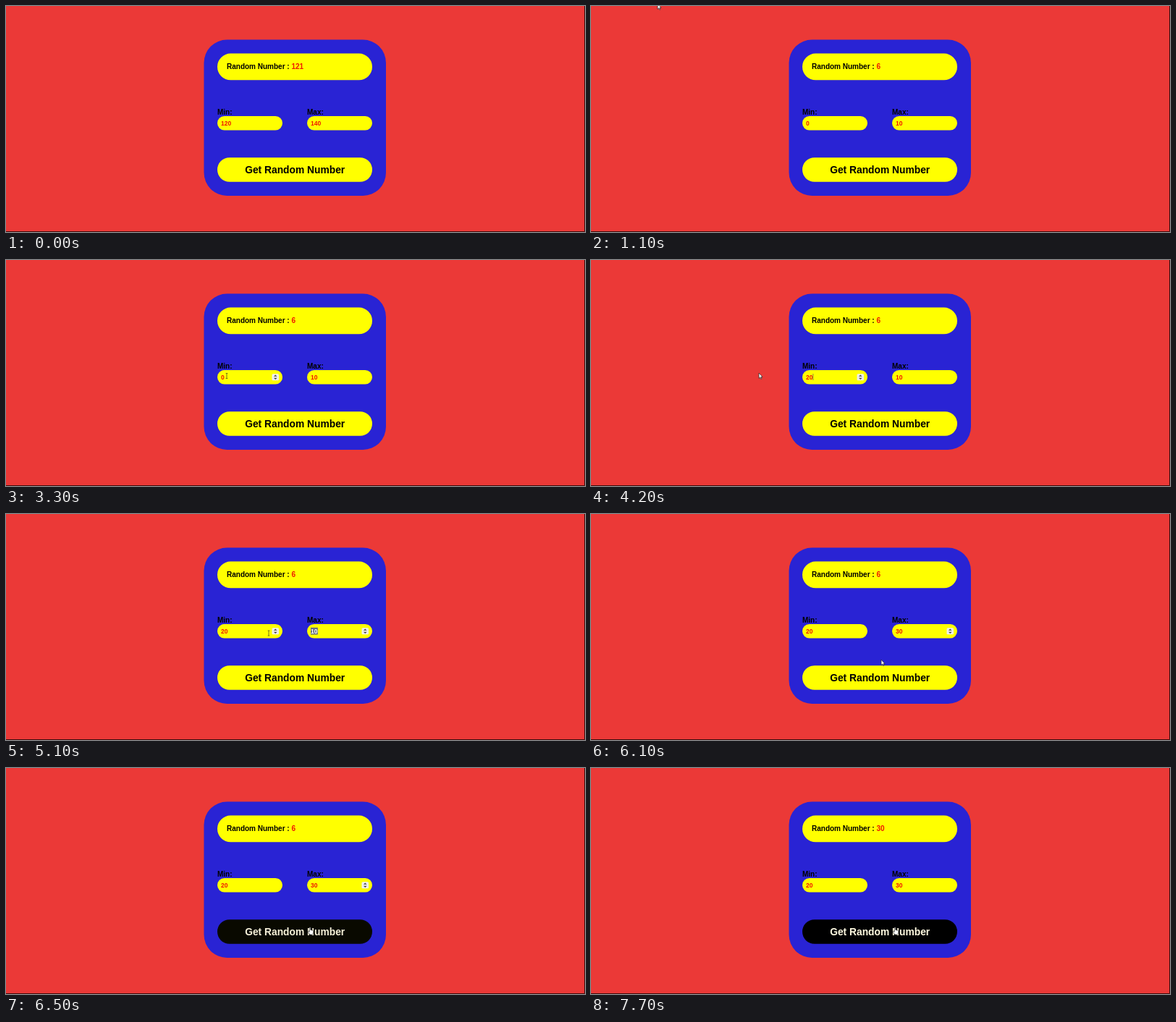
Write an HTML page that moves like this. It is 800x312 px and loops after 8000 ms.

```html
<!DOCTYPE html>
<html lang="en">
<head>
<meta charset="utf-8">
<title>Random number</title>
<style>
  html, body { margin: 0; width: 100%; height: 100%; overflow: hidden; background: #eb3937; }
  svg { display: block; width: 800px; height: 312px; }
  text { font: bold 10px "Liberation Sans", Arial, sans-serif; }
  .pill { fill: #ff0; }
  .red { fill: #f01800; }
  .value { font-size: 8.5px; }
  #label { font-size: 13.8px; text-anchor: middle; }
</style>
</head>
<body>
<svg viewBox="0 0 800 312">
  <defs>
    <g id="spin">
      <rect width="9.5" height="9" rx="1.5" fill="#efefef"/>
      <path d="M2.4 3.6 4.75 1.2 7.1 3.6ZM2.4 5.5 4.75 7.9 7.1 5.5Z" fill="#444"/>
    </g>
  </defs>
  <rect width="800" height="312" fill="#eb3937"/>
  <path d="M0 311.5H799.5V0" fill="none" stroke="#3a0c0c"/>
  <rect x="273.5" y="46.5" width="251.5" height="215.5" rx="32" fill="#2923d4"/>

  <rect class="pill" x="292" y="65.5" width="214" height="36.8" rx="18.4"/>
  <text x="305" y="87.3">Random Number : <tspan id="result" class="red"></tspan></text>

  <text x="292" y="149.6">Min:</text>
  <text x="416" y="149.6">Max:</text>
  <g id="min" transform="translate(292 152)"></g>
  <g id="max" transform="translate(416 152)"></g>

  <rect id="button" x="292" y="209.2" width="214" height="33.6" rx="16.8"/>
  <text id="label" x="399.2" y="230.8">Get Random Number</text>

  <g id="cursor">
    <path id="arrow" d="M0 0V7.4L1.7 5.9 2.8 8.4 3.9 7.9 2.8 5.5H5Z" fill="#fff" stroke="#222" stroke-width=".7"/>
    <path id="beam" d="M-1.3-3.5H1.3M0-3.5V3.5M-1.3 3.5H1.3" fill="none" stroke="#55551a" stroke-width=".8"/>
    <path id="hand" d="M-.8 .8Q0-.5.8.8V4L4 4.8Q4.8 5 4.7 6L4 10.5H-.3L-3 6.5Q-2.6 5.2-.8 6.8Z" fill="#fff" stroke="#222" stroke-width=".6"/>
  </g>
</svg>
<script>
const LOOP = 8000, STEP = 100;
const $ = id => document.getElementById(id);
const show = (node, on) => node.setAttribute("visibility", on ? "visible" : "hidden");
const within = (t, from, to) => t >= from && t < to;

// Pointer runs: [start, end of visibility, [time, x, y] points]
const runs = [
  [1100, 2200, [[1100, 92, -3], [1500, 330, 158], [1900, 600, 150], [2000, 598, 90], [2100, 590, 31]]],
  [2900, 4000, [[2900, 534, 92], [3300, 305, 160], [3500, 226, 158], [3600, 232, 156]]],
  [4200, 5600, [[4300, 232, 156], [4800, 432, 161], [5100, 363, 164.5]]],
  [6000, 8000, [[5900, 363, 164.5], [6200, 420, 219.5]]]
];

function pointer(t) {
  const run = runs.find(r => within(t, r[0], r[1]));
  if (!run) return null;
  const pts = run[2];
  const i = pts.findIndex(p => p[0] > t);
  if (i < 1) return (i ? pts[pts.length - 1] : pts[0]).slice(1);
  const [t0, x0, y0] = pts[i - 1], [t1, x1, y1] = pts[i];
  const k = (t - t0) / (t1 - t0);
  return [x0 + (x1 - x0) * k, y0 + (y1 - y0) * k];
}

function makeField(id) {
  const g = $(id);
  g.innerHTML = `<rect class="pill" width="90" height="19.5" rx="9.75"/>
    <rect class="mark" x="5" y="4.8" height="9.7" fill="#66707c"/>
    <text class="value" x="5" y="12.6"></text>
    <path class="caret" d="M0 5V14" stroke="#655" stroke-width=".7"/>
    <use class="spin" href="#spin" x="75.5" y="5.2"/>`;
  const [mark, text, caret, spin] = ["mark", "value", "caret", "spin"].map(c => g.querySelector("." + c));
  return (value, selected, hasCaret, hasSpin) => {
    const width = value.length * 4.73;
    text.textContent = value;
    text.setAttribute("fill", selected ? "#fff" : "#f01800");
    mark.setAttribute("width", width + .4);
    caret.setAttribute("transform", `translate(${5.4 + width} 0)`);
    show(mark, selected);
    show(caret, hasCaret);
    show(spin, hasSpin);
  };
}
const drawMin = makeField("min"), drawMax = makeField("max");

// CSS "ease" curve, solved by bisection
function ease(x) {
  if (x <= 0 || x >= 1) return x <= 0 ? 0 : 1;
  const bez = (u, a, b) => 3 * u * (1 - u) ** 2 * a + 3 * u * u * (1 - u) * b + u ** 3;
  let lo = 0, hi = 1;
  for (let i = 0; i < 20; i++) {
    const mid = (lo + hi) / 2;
    if (bez(mid, .25, .25) < x) lo = mid; else hi = mid;
  }
  return bez(lo, .1, 1);
}

function draw(t) {
  const pos = pointer(t);
  const over = (x, y, w, h) => !!pos && within(pos[0], x, x + w) && within(pos[1], y, y + h);
  const overMin = over(292, 152, 90, 19.5), overMax = over(416, 152, 90, 19.5);
  const overButton = over(292, 209, 214, 34);

  const min = t < 100 ? "120" : t < 4000 ? "0" : t < 4100 ? "2" : "20";
  const max = t < 100 ? "140" : t < 5600 ? "10" : "30";
  $("result").textContent = t < 100 ? "121" : t < 7000 ? "6" : t < 7700 ? "24" : "30";
  drawMin(min, within(t, 3400, 4000), within(t, 4000, 4800), overMin || within(t, 3300, 4800));
  drawMax(max, within(t, 4900, 5600), within(t, 5600, 6000), overMax || within(t, 4800, 7000));

  const k = ease((t - 6120) / 500);
  const lit = 255 * (1 - k);
  $("button").setAttribute("fill", `rgb(${lit},${lit},0)`);
  $("label").setAttribute("fill", `rgb(${255 * k},${250 * k},${225 * k})`);

  const beam = overMin || overMax;
  show($("arrow"), pos && !beam && !overButton);
  show($("beam"), beam);
  show($("hand"), overButton);
  if (pos) $("cursor").setAttribute("transform", `translate(${pos[0]} ${pos[1]})`);
}

const start = performance.now();
function tick() {
  const t = (performance.now() - start) % LOOP;
  draw(Math.floor(t / STEP) * STEP);
  requestAnimationFrame(tick);
}
tick();
</script>
</body>
</html>
```
